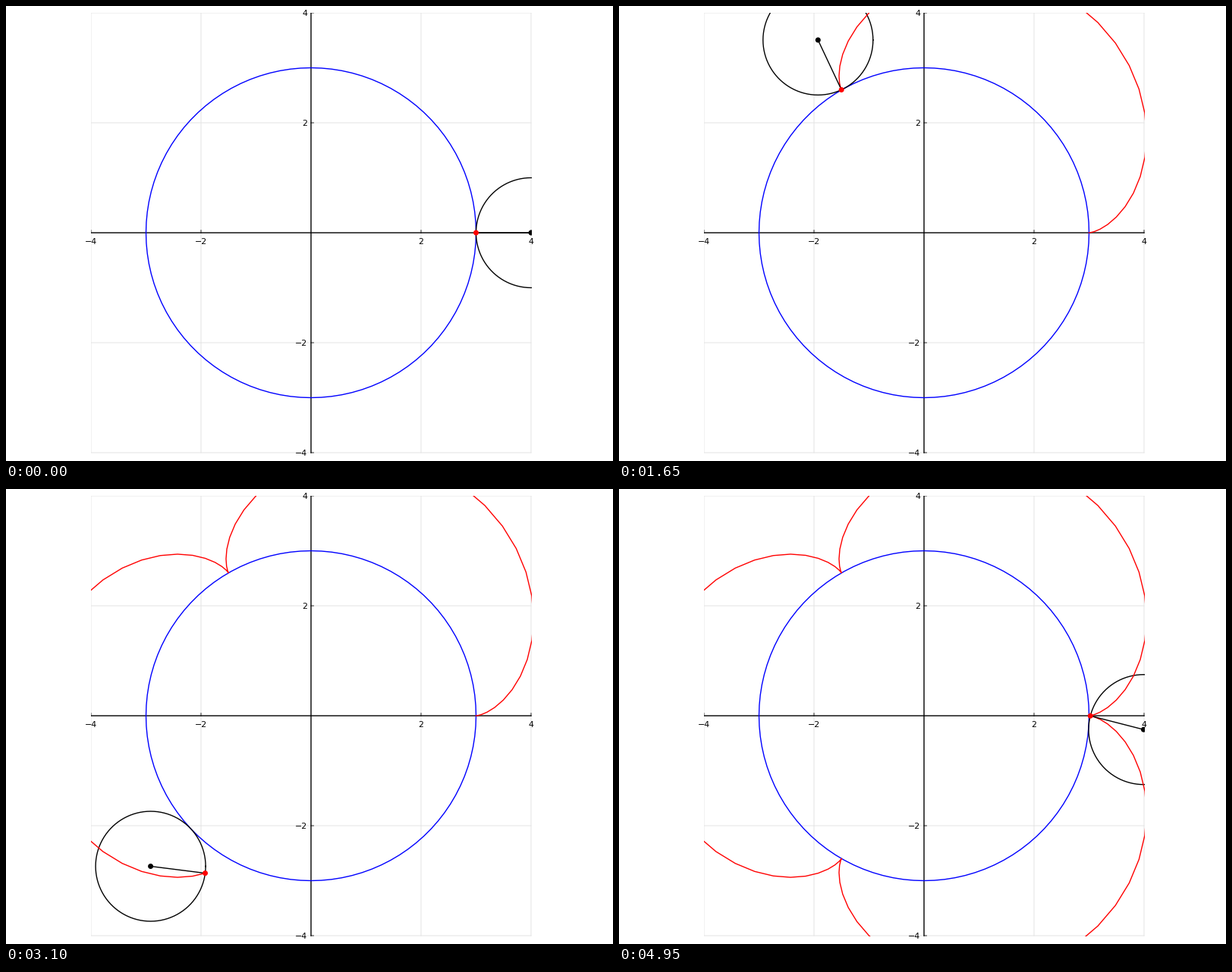
Recreate the animation shown at these times as a matplotlib script. Size 800 px wide and 600 px high, loop 5 s.

```python
import numpy as np
import matplotlib.pyplot as plt
from matplotlib.animation import FuncAnimation
from matplotlib.transforms import Bbox

W, H, DPI = 800, 600, 100
FRAMES, INTERVAL = 100, 50
LEFT, BOTTOM, SIDE = 112, 11, 580
LIMIT = 4
BIG, SMALL = 3, 1
REACH = BIG + SMALL
PX = 2 * LIMIT / SIDE      # one pixel in data units
PT = 72 / DPI              # one pixel in points

plt.rcParams["font.family"] = "DejaVu Sans"
fig = plt.figure(figsize=(W / DPI, H / DPI), dpi=DPI, facecolor="white")
ax = fig.add_axes([LEFT / W, BOTTOM / H, SIDE / W, SIDE / H])
ax.set(xlim=(-LIMIT, LIMIT), ylim=(-LIMIT, LIMIT))
ax.axis("off")
clip = Bbox.from_bounds(LEFT, BOTTOM - 1, SIDE + 1, SIDE + 1)


def line(x, y, color, width=1.39, z=3):
    artist, = ax.plot(x, y, color=color, lw=width * PT, zorder=z, snap=False)
    artist.set_clip_box(clip)
    return artist


def dot(color, z):
    disc = ax.add_patch(plt.Circle((0, 0), 3.5 * PX, color=color, lw=0,
                                   zorder=z))
    disc.set_clip_box(clip)
    return disc


def label(value, xy, offset, ha):
    text = str(value).replace("-", "\u2212")
    ax.annotate(text, xy, xytext=offset, textcoords="offset pixels",
                ha=ha, va="baseline", fontsize=11 * PT,
                annotation_clip=False)


def draw_axes():
    span = [-LIMIT, LIMIT]
    tick = [0, 3.5 * PX]
    for v in (-4, -2, 2, 4):
        line([v, v], span, "#e5e5e5", 1, z=1)
        line(span, [v, v], "#e5e5e5", 1, z=1)
        line([v, v], tick, "black", 0.8, z=2)
        line(tick, [v, v], "black", 0.8, z=2)
        label(v, (v, 0), (0, -15), "center")
        label(v, (0, v), (-5, -4), "right")
    line(span, [0, 0], "black", z=2)
    line([0, 0], span, "black", z=2)


draw_axes()

turn = np.linspace(0, 2 * np.pi, FRAMES + 1)
ring_x, ring_y = np.cos(turn), np.sin(turn)
ratio = REACH / SMALL
path_x = REACH * ring_x - SMALL * np.cos(ratio * turn)
path_y = REACH * ring_y - SMALL * np.sin(ratio * turn)

line(BIG * ring_x, BIG * ring_y, "blue", z=3)
wheel = line([], [], "black", z=4)
trace = line([], [], "red", z=5)
spoke = line([], [], "black", z=6)
hub = dot("black", 7)
pen = dot("red", 8)


def update(i):
    cx, cy = REACH * ring_x[i], REACH * ring_y[i]
    px, py = path_x[i], path_y[i]
    wheel.set_data(cx + SMALL * ring_x, cy + SMALL * ring_y)
    trace.set_data(path_x[:i + 1], path_y[:i + 1])
    spoke.set_data([cx, px], [cy, py])
    hub.center = cx, cy
    pen.center = px, py
    return wheel, trace, spoke, hub, pen


anim = FuncAnimation(fig, update, frames=FRAMES, interval=INTERVAL,
                     init_func=lambda: update(0), repeat=True,
                     repeat_delay=0, blit=False)
plt.show()
```
